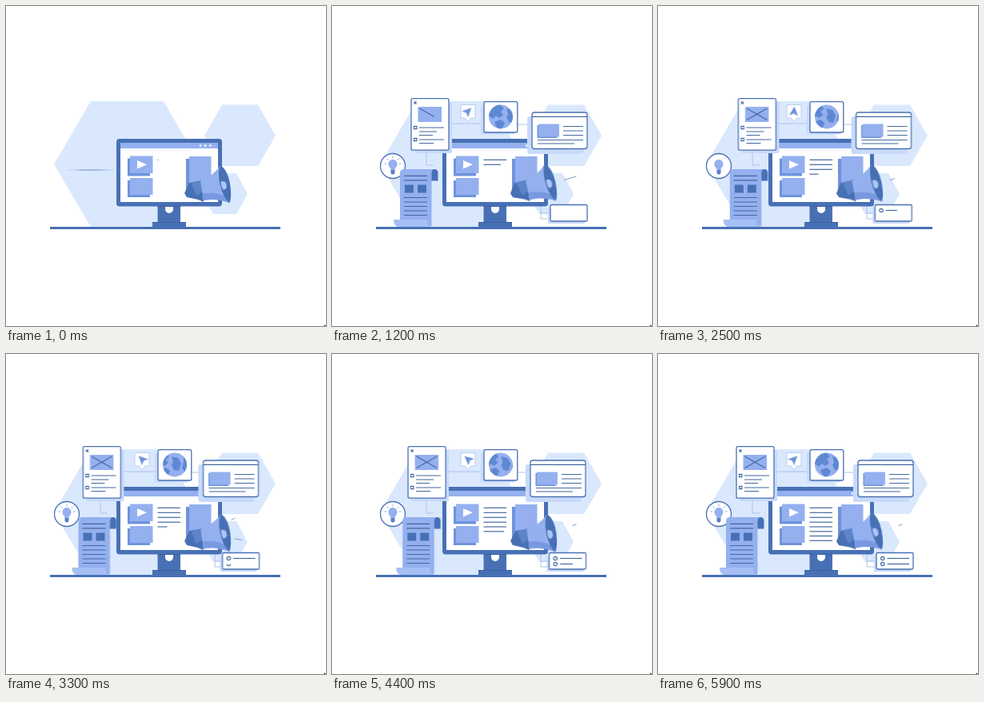
Recreate the animation shown at these times as an HTML page without scripts. Size 400 by 400 pixels, loop 6 s.

```html
<!DOCTYPE html>
<html lang="en">
<head>
<meta charset="utf-8">
<title>Digital marketing</title>
<style>
html, body { margin: 0; width: 100%; height: 100%; overflow: hidden; background: #fff }
svg { display: block; width: 100vw; height: 100vh }

.pale { fill: #dae8fe }
.shade { fill: #c8dafb }
.light { fill: #94b0ef }
.mid { fill: #6f93dd }
.dark { fill: #4871b5 }
.white { fill: #fff }
.card { fill: #fff; stroke: #4a70b4; stroke-width: 1.3 }
.ink { fill: none; stroke: #44699f; stroke-width: 1.2 }
.thin { fill: none; stroke: #a9bfe8; stroke-width: .9 }
.draw { stroke-dasharray: 1 2; stroke-dashoffset: 1 }

.sway, .card-sway, .scroll-sway, .horn, .plane, .pop, .pop-late, .unroll, .appear {
  animation: 6s linear infinite;
}
.sway { animation-name: sway }
.card-sway { animation-name: card-sway }
.scroll-sway { animation-name: scroll-sway }
.horn { animation-name: horn; transform-origin: 230px 236px }
.plane { animation-name: plane; transform-origin: 170px 131.5px }
.pop, .pop-late { transform-box: fill-box; transform-origin: center }
.pop { animation-name: pop }
.pop-late { animation-name: pop-late }
.unroll { animation-name: unroll; transform-origin: 105px 204.5px }
.appear { animation-name: appear }
.rays { animation: blink 1.5s linear infinite }
.burst, .pulse { stroke-dasharray: 1 2; animation: burst 1.5s linear infinite }
.pulse { animation-name: pulse }

@keyframes sway {
  0%, 20%, 98.3%, 100% { transform: none }
  41.7% { transform: translateX(calc(var(--reach) * .7)) }
  55% { transform: translateX(var(--reach)) }
  66.7% { transform: translateX(calc(var(--reach) * .77)) }
  81.7% { transform: translateX(calc(var(--reach) * .4)) }
}
@keyframes card-sway {
  0% { transform: translateX(-1px) }
  20% { transform: none }
  35%, 41.7% { transform: translateX(1.4px) }
  55% { transform: translateX(-2.6px) }
  66.7% { transform: translateX(-5px) }
  81.7% { transform: translateX(-2.6px) }
  98.3%, 100% { transform: translateX(-1px) }
}
@keyframes scroll-sway {
  0%, 20% { transform: none }
  41.7% { transform: translateX(4.8px) }
  55% { transform: translateX(5.5px) }
  66.7% { transform: translateX(4.8px) }
  81.7% { transform: translateX(1.2px) }
  98.3%, 100% { transform: none }
}
@keyframes horn {
  0% { transform: none }
  20% { transform: rotate(-3deg) }
  41.7% { transform: rotate(-2deg) }
  55% { transform: rotate(1deg) }
  66.7% { transform: rotate(2deg) }
  81.7% { transform: rotate(1deg) }
  98.3%, 100% { transform: rotate(-2deg) }
}
@keyframes plane {
  0%, 20% { transform: rotate(45deg) }
  41.7% { transform: rotate(5deg) }
  55% { transform: rotate(-45deg) }
  66.7% { transform: rotate(-90deg) }
  81.7% { transform: rotate(0) }
  98.3%, 100% { transform: rotate(45deg) }
}
@keyframes pop {
  0% { transform: scale(0); animation-timing-function: ease-out }
  11%, 100% { transform: none }
}
@keyframes pop-late {
  0%, 5% { transform: scale(0); animation-timing-function: ease-out }
  16%, 100% { transform: none }
}
@keyframes unroll {
  0% { transform: scaleY(.015); animation-timing-function: ease-out }
  12%, 100% { transform: none }
}
@keyframes appear {
  0%, 7% { opacity: 0 }
  13%, 100% { opacity: 1 }
}
@keyframes blink {
  0%, 23%, 78%, 100% { opacity: 1 }
  28%, 74% { opacity: 0 }
}
@keyframes burst {
  0%, 8% { stroke-dashoffset: 1 }
  22% { stroke-dashoffset: 0 }
  38%, 100% { stroke-dashoffset: -1 }
}
@keyframes pulse {
  0%, 58% { stroke-dashoffset: 1 }
  80% { stroke-dashoffset: 0 }
  100% { stroke-dashoffset: -1 }
}
</style>
</head>
<body>
<svg viewBox="0 0 400 400">
  <defs><clipPath id="globe"><circle cx="211" cy="138.500" r="15"/></clipPath></defs>

  <g class="pale">
    <path d="M106 119H197L243 198 197 276H106L60 198Z"/>
    <path d="M270 123.500H315L337 162 315 200H270L248 162Z"/>
    <path d="M259 209H288L302 235 288 260H259L244 235Z"/>
  </g>

  <g class="thin appear">
    <path d="M146 147H190M232 148H250M118 180V199H127M261 249V266H274M261 259H273"/>
  </g>

  <!-- monitor -->
  <g>
    <rect class="dark" x="138" y="166" width="132" height="84.500" rx="4"/>
    <rect class="white" x="143" y="171" width="122" height="74"/>
    <rect class="light" x="143" y="171" width="122" height="7"/>
    <g class="white">
      <circle cx="243" cy="174.500" r="1.300"/><circle cx="249" cy="174.500" r="1.300"/><circle cx="255.500" cy="174.500" r="1.300"/>
    </g>
    <path class="dark" d="M189.500 250H218V270H225V276H183V270H189.500Z"/>
    <path d="M189.500 250.500H218M183 270.500H225" fill="none" stroke="#3b61a3"/>
    <path class="white" d="M199 251H209V254A5 5 0 0 1 199 254Z"/>
    <g class="mid">
      <rect x="152" y="190.500" width="28" height="22"/>
      <rect x="152" y="218" width="28" height="21"/>
      <rect x="225" y="191" width="28" height="46"/>
    </g>
    <g class="light">
      <rect x="155" y="187.500" width="28.500" height="21.500"/>
      <rect x="155" y="215" width="28.500" height="21"/>
      <rect x="229" y="188" width="27.500" height="46"/>
    </g>
    <path class="white" d="M164 193L176 198.300 164 203.500Z"/>
    <g class="ink">
      <path class="draw" pathLength="1" d="M189.500 192.300h28.500"><animate attributeName="stroke-dashoffset" values=".97;0;0" keyTimes="0;.11;1" dur="6s" repeatCount="indefinite"/></path>
      <path class="draw" pathLength="1" d="M189.500 198.300h28.500"><animate attributeName="stroke-dashoffset" values="1;1;0;0" keyTimes="0;.11;.23;1" dur="6s" repeatCount="indefinite"/></path>
      <path class="draw" pathLength="1" d="M189.500 204.300h28.500"><animate attributeName="stroke-dashoffset" values="1;1;0;0" keyTimes="0;.24;.36;1" dur="6s" repeatCount="indefinite"/></path>
      <path class="draw" pathLength="1" d="M189.500 210.200h28.500"><animate attributeName="stroke-dashoffset" values="1;1;0;0" keyTimes="0;.37;.49;1" dur="6s" repeatCount="indefinite"/></path>
      <path class="draw" pathLength="1" d="M189.500 216h28.500"><animate attributeName="stroke-dashoffset" values="1;1;0;0" keyTimes="0;.5;.62;1" dur="6s" repeatCount="indefinite"/></path>
      <path class="draw" pathLength="1" d="M189.500 221.800h28.500"><animate attributeName="stroke-dashoffset" values="1;1;0;0" keyTimes="0;.625;.745;1" dur="6s" repeatCount="indefinite"/></path>
      <path class="draw" pathLength="1" d="M189.500 227.500h28.500"><animate attributeName="stroke-dashoffset" values="1;1;0;0" keyTimes="0;.75;.82;1" dur="6s" repeatCount="indefinite"/></path>
      <path class="draw" pathLength="1" d="M189.500 233.300h28.500"><animate attributeName="stroke-dashoffset" values="1;1;0;0" keyTimes="0;.85;.96;1" dur="6s" repeatCount="indefinite"/></path>
    </g>
  </g>

  <rect class="dark" x="55" y="276" width="288" height="3"/>

  <!-- checklist card -->
  <g class="card-sway"><g class="pop">
    <rect class="shade" x="103" y="120" width="47" height="64" rx="2"/>
    <rect class="card" x="99" y="115.700" width="47" height="64.500" rx="2"/>
    <rect class="light" x="107.500" y="126" width="29.500" height="19"/>
    <path class="ink" stroke-width="1" d="M102.500 119.500l3 3m0-3l-3 3M102.500 150.300h3.400v3.400h-3.400zM102.500 165.300h3.400v3.400h-3.400z"/>
    <path class="ink" d="M109 152H140M109 157H131M109 161.500H126M109 167H140M109 171.500H127"/>
    <path class="ink draw" pathLength="1" d="M109.500 128L135 142.500"><animate attributeName="stroke-dashoffset" values="1;1;0;0" keyTimes="0;.13;.23;1" dur="6s" repeatCount="indefinite"/></path>
    <path class="ink draw" pathLength="1" d="M135 128L109.500 142.500"><animate attributeName="stroke-dashoffset" values="1;1;0;0" keyTimes="0;.24;.34;1" dur="6s" repeatCount="indefinite"/></path>
  </g></g>

  <!-- message bubble -->
  <g class="pop">
    <path d="M161 123.500H179V140H173.500L170 145 166.500 140H161Z" fill="#fff" stroke="#bccdef"/>
    <path class="plane mid" d="M170 125.500L175.500 137 170 134.500 164.500 137Z"/>
  </g>

  <!-- globe card -->
  <g class="pop">
    <rect class="shade" x="186" y="123.500" width="42" height="37" rx="2"/>
    <rect class="card" x="190" y="119.700" width="41.800" height="38.300" rx="2"/>
    <circle class="light" cx="211" cy="138.500" r="15"/>
    <g clip-path="url(#globe)">
      <g class="sway" style="--reach:-11px" fill="#5f88d3">
        <path d="M196 127q8-8 15-3l4 4-4 4 3 4-5 4-4-3-4 4-6-5z"/>
        <path d="M203 145l8-3 5 4-2 5-5 4-4-5z"/>
        <path d="M218 128l8 2 4 7-3 9-6-1-3-6 2-4z"/>
        <path d="M233 126l7 4-2 7 4 5-5 8-6-7 2-8z"/>
      </g>
    </g>
  </g>

  <!-- browser card -->
  <g class="sway" style="--reach:-3.500px"><g class="pop">
    <rect class="shade" x="244" y="138" width="70" height="47" rx="3"/>
    <rect class="card" x="250" y="133" width="69" height="45.500" rx="3"/>
    <path class="ink" d="M250 138.300H319"/>
    <rect class="mid" x="256.500" y="149" width="25" height="16"/>
    <rect class="light" x="258" y="147.500" width="26" height="16"/>
    <path class="ink" d="M289 150.500H314M289 156H314M289 161.500H314M257 167.500H314M257 172H303"/>
  </g></g>

  <!-- option box -->
  <g class="sway" style="--reach:-2.500px"><g class="pop">
    <rect class="shade" x="270" y="252" width="46" height="20" rx="1.500"/>
    <rect class="card" x="273" y="248.500" width="46" height="20.500" rx="1.500"/>
    <g class="ink">
      <circle class="draw" pathLength="1" cx="280.800" cy="255.500" r="2.200"><animate attributeName="stroke-dashoffset" values="1;1;0;0" keyTimes="0;.22;.32;1" dur="6s" repeatCount="indefinite"/></circle>
      <path class="draw" pathLength="1" d="M286.500 255.500H314"><animate attributeName="stroke-dashoffset" values="1;1;0;0" keyTimes="0;.33;.5;1" dur="6s" repeatCount="indefinite"/></path>
      <circle class="draw" pathLength="1" cx="280.800" cy="262.500" r="2.200"><animate attributeName="stroke-dashoffset" values="1;1;0;0" keyTimes="0;.5;.6;1" dur="6s" repeatCount="indefinite"/></circle>
      <path class="draw" pathLength="1" d="M286.500 262.500H314"><animate attributeName="stroke-dashoffset" values="1;1;0;0" keyTimes="0;.64;.8;1" dur="6s" repeatCount="indefinite"/></path>
    </g>
  </g></g>

  <!-- light bulb -->
  <g class="pop-late">
    <circle class="card" cx="76" cy="200" r="15.500"/>
    <path class="light" d="M73.500 205q0-2-2-4a5.600 5.600 0 1 1 9 0q-2 2-2 4z"/>
    <path d="M73.500 205h5v4l-1.500 1.500h-2l-1.500-1.500z" fill="#5a80c8"/>
    <path class="rays" d="M76 188v2.500M68.500 190.500l1.700 2M83.500 190.500l-1.700 2M65.500 197h2.500M86.500 197h-2.500" fill="none" stroke="#8aa8e6"/>
  </g>

  <!-- paper scroll -->
  <g class="scroll-sway"><g class="unroll">
    <path class="dark" d="M123 204H128Q132.500 204 132.500 209V218.500H123Z"/>
    <path class="light" d="M85 270V209Q85 204 90 204H128.500Q124.500 204 124.500 209V275H85Z"/>
    <path d="M77 267H119Q118 275 124.500 276H82Q77 275 77 267Z" fill="#a6bff5"/>
    <path class="dark" d="M91 223.500h11v10h-11zM107 223.500h11v10h-11z"/>
    <path class="ink" d="M90 212.300H119M90 217.800H119M90 239.500H119M90 245H119M90 250.500H119M90 256H119M90 261.500H119"/>
  </g></g>

  <!-- megaphone -->
  <g class="horn">
    <path d="M245 218L229 221 223 234 226 239 240 242 247 245Z" fill="#4871b5"/>
    <path d="M231 221L245 218 247 231 238 237Z" fill="#5c84c9"/>
    <path class="light" d="M268 199.500Q258 213 243 219L247 243Q263 240 279.500 246Z"/>
    <path d="M246 234Q263 232 276 239L279.500 246Q263 240 247 243Z" fill="#7899e2"/>
    <path class="dark" d="M268 199Q277 205 280 222 282.500 239 279.500 246 272 241 267.500 223 264 206 268 199Z"/>
    <path d="M268.500 219.500Q274 217.500 275.500 223T272 230Q269 227 268.500 219.500Z" fill="#adc4f5"/>
  </g>
  <g fill="none" stroke="#7d99cc">
    <path class="burst" pathLength="1" d="M281.500 207.500L287 204.500"/>
    <path class="pulse" pathLength="1" d="M290 217.500L305.500 213"/>
    <path class="burst" pathLength="1" d="M286 231L297 232.500"/>
  </g>

  <rect x="397.500" y="398.800" width="1.800" height="1.200" fill="#222"/>
</svg>
</body>
</html>
```
